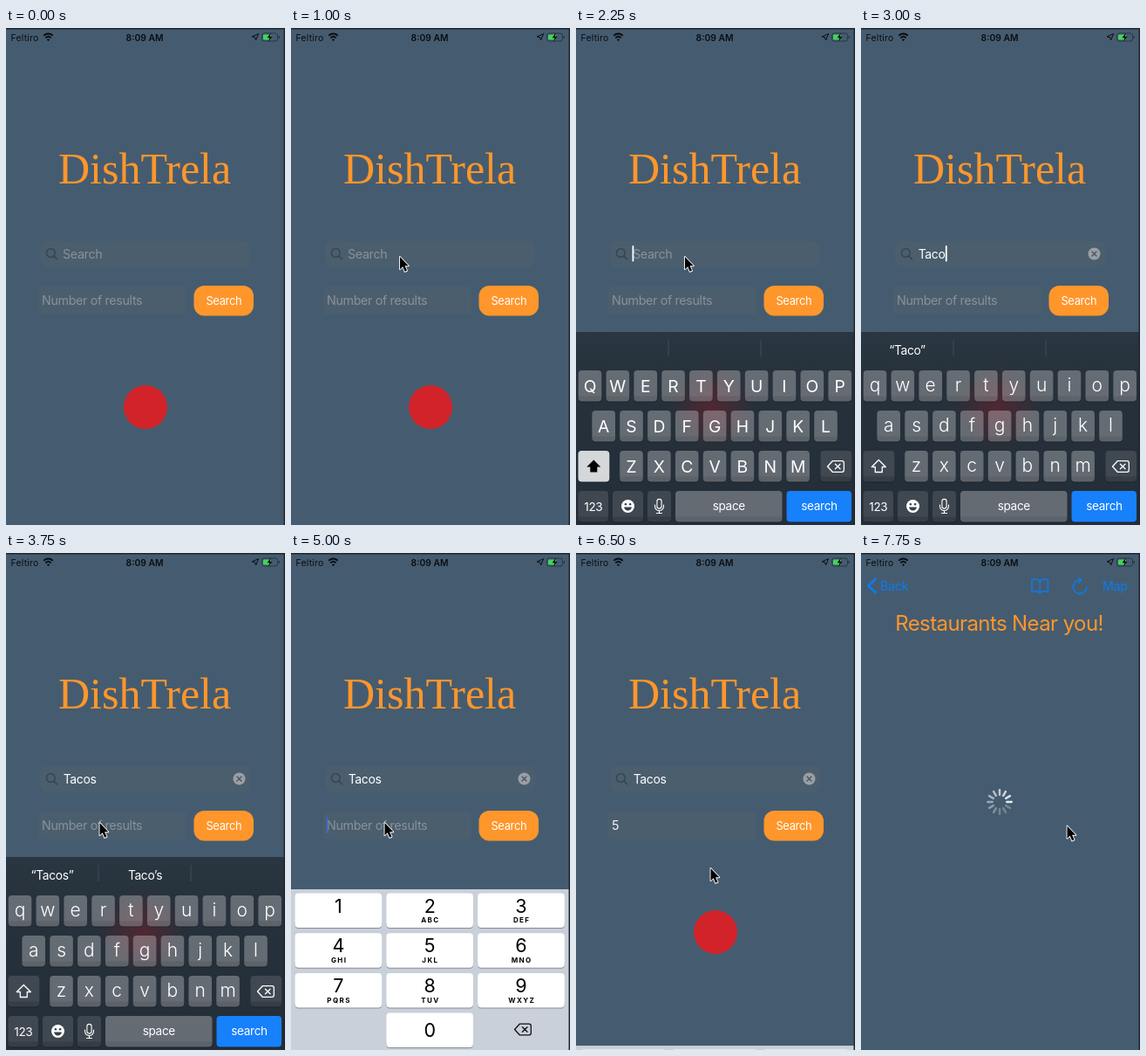
An HTML page with a canvas for the animation above (8000 ms loop, 320 px wide and 569 px high).

```html
<!DOCTYPE html>
<html lang="en">
<head>
<meta charset="utf-8">
<title>Restaurant search</title>
<style>
  html, body { margin: 0; width: 100%; height: 100%; overflow: hidden; background: #455c70; }
  canvas { display: block; width: 320px; height: 569px; }
</style>
</head>
<body>
<canvas id="stage"></canvas>
<script>
const W = 320, H = 569, LOOP = 8000, STEP = 250;
const BG = '#455c70', FIELD = '#4a5e6e', ORANGE = '#ff962b', BLUE = '#0a7cf2', GREY = '#8b9196', INK = '#0b0d10';
const canvas = document.getElementById('stage');
const ctx = canvas.getContext('2d');
const ratio = window.devicePixelRatio || 1;
canvas.width = W * ratio;
canvas.height = H * ratio;

// Share of the way still to go, for a motion that starts fast and settles.
const remaining = (t, start, duration, power) =>
  (1 - Math.min(1, Math.max(0, (t - start) / duration))) ** power;

// y is the middle of the capitals.
function text(str, x, y, size, color, { align = 'left', weight = 400, track = -0.025 * size } = {}) {
  ctx.font = `${weight} ${size}px Inter, sans-serif`;
  ctx.letterSpacing = track + 'px';
  ctx.textAlign = align;
  ctx.fillStyle = color;
  ctx.fillText(str, x, y + size * 0.364);
}

function box(x, y, w, h, r, color) {
  ctx.fillStyle = color;
  ctx.beginPath();
  ctx.roundRect(x, y, w, h, r);
  ctx.fill();
}

function disc(x, y, r, color) {
  ctx.fillStyle = color;
  ctx.beginPath();
  ctx.arc(x, y, r, 0, 7);
  ctx.fill();
}

function shape(d, x, y, { fill, stroke, width = 1.3 }) {
  const path = new Path2D(d);
  ctx.save();
  ctx.translate(x, y);
  ctx.lineCap = ctx.lineJoin = 'round';
  ctx.lineWidth = width;
  if (stroke) { ctx.strokeStyle = stroke; ctx.stroke(path); }
  if (fill) { ctx.fillStyle = fill; ctx.fill(path); }
  ctx.restore();
}

function statusBar() {
  text('Feltiro', 5.5, 11, 10.4, INK, { track: 0.25 });
  text('8:09 AM', 159, 11, 10.3, INK, { align: 'center', weight: 600, track: 0 });
  shape('M-4.6-2.2A6.6 6.6 0 0 1 4.6-2.2M-2.6.4A3.8 3.8 0 0 1 2.6.4', 48.5, 10.5, { stroke: INK, width: 1.9 });
  shape('M0 4.8L-1.7 2.6Q0 1.3 1.7 2.6Z', 48.5, 10.5, { fill: INK });
  shape('M3.5-3.5L.5 3.5L-.3.3L-3.5-.5Z', 286, 10.5, { stroke: INK, width: 1 });
  ctx.strokeStyle = '#27323c';
  ctx.lineWidth = 0.9;
  ctx.beginPath();
  ctx.roundRect(293.5, 6, 18, 9, 2.5);
  ctx.stroke();
  box(295, 7.5, 9, 6, 1.2, '#43d45c');
  box(312.6, 9, 1.2, 3, 0.6, '#27323c');
  shape('M1.2-5L-3 .8H-.3L-1.2 5L3-.8H.3Z', 302.5, 10.5, { fill: INK });
}

function home(t, query, count) {
  ctx.fillStyle = BG;
  ctx.fillRect(0, 0, W, H);
  ctx.font = '50px "Liberation Serif", serif';
  ctx.letterSpacing = '0px';
  ctx.textAlign = 'left';
  ctx.fillStyle = ORANGE;
  ctx.fillText('DishTrela', 60, 177.5);

  box(39, 244, 241, 30, 8, FIELD);
  shape('M4.2 0A4.9 4.9 0 1 1-5.6 0A4.9 4.9 0 1 1 4.2 0M2.8 3.5L6.6 7.2', 52, 257.5, { stroke: '#33424f', width: 1.3 });
  if (query) text(query, 65.7, 258.5, 14, '#fff');
  else text('Search', 65, 258.5, 14.3, GREY);
  if (query) {
    disc(267.5, 258.5, 7, '#9a9fa4');
    shape('M-2.5-2.5L2.5 2.5M2.5-2.5L-2.5 2.5', 267.5, 258.5, { stroke: '#435464' });
  }
  if (t >= 1000 && t < 3500 && (query || Math.floor((t - 250) / 500) % 2 === 0)) {
    const width = query ? ctx.measureText(query).width + 1.5 : 0;
    box(64.5 + width, 249, 1.8, 18.5, 0.9, '#fff');
  }

  box(37, 296, 170, 32, 5, FIELD);
  text(count || 'Number of results', 41, 312, 14.3, count ? '#f4f6f8' : GREY);
  if (t >= 4000 && t < 6250 && (count || t / 500 % 2 < 1))
    box(count ? 50.5 : 40.5, 302.5, 2, 18.5, 1, '#4368c4');

  box(215.5, 295, 68.5, 34.5, 12, ORANGE);
  text('Search', 249.8, 312.7, 12.9, t === 7000 ? '#ffd5a6' : '#fff', { align: 'center' });
  disc(160, 434, 25, '#d2232a');
}

function key(x, y, w, h, color, shadow) {
  box(x, y + h - 6, w, 7, [0, 0, 4, 4], shadow);
  box(x, y, w, h, 4, color);
}

function backspace(x, y, color) {
  shape('M-9.5 0L-3.8-6.3H7Q9.3-6.3 9.3-4V4Q9.3 6.3 7 6.3H-3.8ZM-.6-2.8L5 2.8M5-2.8L-.6 2.8', x, y, { stroke: color });
}

function letterKeyboard(offset, query) {
  const top = 348;
  const light = 'rgba(255,255,255,.29)', dark = 'rgba(255,255,255,.12)', shadow = 'rgba(10,14,18,.35)';
  const back = ctx.createLinearGradient(0, top + offset, 0, H + offset);
  back.addColorStop(0, '#2a3641');
  back.addColorStop(0.25, '#26313b');
  back.addColorStop(1, '#242e38');
  ctx.fillStyle = back;
  ctx.fillRect(0, top + offset, W, H);
  const glow = ctx.createRadialGradient(156, 434, 0, 156, 434, 50);
  glow.addColorStop(0, 'rgba(150,25,35,.38)');
  glow.addColorStop(1, 'rgba(150,25,35,0)');
  ctx.fillStyle = glow;
  ctx.fillRect(100, Math.max(380, top + offset), 110, 110);

  ctx.save();
  ctx.translate(0, offset);
  for (const x of [105.5, 211.5]) box(x, 357, 1, 19, 0, '#414d58');
  if (query) text(`“${query}”`, 53, 369, 13.8, '#fff', { align: 'center' });
  if (query === 'Tacos') text('Taco’s', 159.5, 369, 13.8, '#fff', { align: 'center' });

  ['QWERTYUIOP', 'ASDFGHJKL', 'ZXCVBNM'].forEach((letters, row) => {
    const first = [16, 31.7, 63.5][row], y = 392 + row * 46;
    [...letters].forEach((letter, i) => {
      const x = first + i * 31.85;
      key(x - 13.3, y, 26.6, 35.5, light, shadow);
      if (query) text(letter.toLowerCase(), x, y + 16, 21, '#fff', { align: 'center', weight: 300, track: 0 });
      else text(letter, x, y + 18, 19.3, '#fff', { align: 'center', track: 0 });
    });
  });

  key(2.5, 484, 35.8, 35.5, query ? dark : '#d4d8db', shadow);
  const arrow = 'M0-7.5L8 .5H4V6.5H-4V.5H-8Z';
  shape(arrow, 20.3, 502, query ? { stroke: '#fff' } : { fill: '#000' });
  key(280.5, 484, 35.5, 35.5, dark, shadow);
  backspace(298, 502, '#fff');

  key(2.5, 530, 34.5, 35.5, dark, shadow);
  text('123', 19.8, 548, 13.6, '#fff', { align: 'center' });
  key(42, 530, 35, 35.5, dark, shadow);
  disc(59.5, 547.5, 7.5, '#fff');
  disc(56.9, 545.3, 1.2, '#35404a');
  disc(62.1, 545.3, 1.2, '#35404a');
  shape('M-4.5 1H4.5Q3.5 5 0 5Q-3.5 5-4.5 1Z', 59.5, 547.5, { fill: '#35404a' });
  key(82, 530, 27, 35.5, dark, shadow);
  shape('M-2.6-5.5A2.6 2.6 0 0 1 2.6-5.5V0A2.6 2.6 0 0 1-2.6 0ZM-5-1.5V0A5 5 0 0 0 5 0V-1.5M0 5V8M-3 8H3', 95.5, 547.5, { stroke: '#fff', width: 1.1 });
  key(114, 530, 122.5, 35.5, light, shadow);
  text('space', 175.3, 547.5, 13.6, '#fff', { align: 'center' });
  key(241.5, 530, 74.5, 35.5, '#1780fb', shadow);
  text('search', 279, 547.5, 13.6, '#fff', { align: 'center' });
  ctx.restore();
}

function numberPad(offset, pressed) {
  const groups = ['', 'ABC', 'DEF', 'GHI', 'JKL', 'MNO', 'PQRS', 'TUV', 'WXYZ'];
  ctx.save();
  ctx.translate(0, offset);
  ctx.fillStyle = '#cad0d9';
  ctx.fillRect(0, 385, W, H);
  for (let n = 1; n <= 10; n++) {
    const col = n === 10 ? 1 : (n - 1) % 3, row = Math.floor((n - 1) / 3);
    const x = 4.6 + col * 104.8, y = 389.5 + row * 45.7, middle = x + 49.8;
    key(x, y, 99.5, 39.5, n === pressed ? '#b3bac5' : '#fff', '#898d93');
    text(String(n % 10), middle, y + (n === 10 ? 19.5 : 14.3), 21.5, '#000', { align: 'center', track: 0 });
    text(groups[n - 1] || '', middle + 0.7, y + 30.7, 8, '#000', { align: 'center', weight: 700, track: 1.4 });
  }
  backspace(266, 545.5, '#111');
  ctx.restore();
}

function results(t, left, opacity) {
  ctx.save();
  ctx.translate(left, 0);
  ctx.fillStyle = BG;
  ctx.fillRect(0, 0, W, H);
  text('Restaurants Near you!', 158.5, 80.5, 24, ORANGE, { align: 'center' });
  const lead = Math.floor(t * 12 / 1000) + 6;
  ctx.lineCap = 'round';
  ctx.lineWidth = 2.5;
  for (let i = 0; i < 12; i++) {
    const age = (lead - i) % 12, angle = i * Math.PI / 6;
    const sx = Math.sin(angle), sy = -Math.cos(angle);
    ctx.strokeStyle = `rgba(240,243,246,${Math.max(0.28, 0.95 - age * 0.075)})`;
    ctx.beginPath();
    ctx.moveTo(159 + sx * 8.3, 285 + sy * 8.3);
    ctx.lineTo(159 + sx * 13.7, 285 + sy * 13.7);
    ctx.stroke();
  }
  ctx.restore();

  // The navigation bar fades in place while the page slides.
  ctx.save();
  ctx.globalAlpha = opacity;
  shape('M4.3-8L-4 0L4.3 8', 12.5, 37.5, { stroke: BLUE, width: 2.5 });
  text('Back', 22, 38, 14.3, BLUE);
  shape('M0-5.5Q-4-9-9.2-6.8V7Q-4 5 0 7.8Q4 5 9.2 7V-6.8Q4-9 0-5.5V7.8', 205.2, 37.7, { stroke: BLUE, width: 1.4 });
  shape('M1-7.5A7.8 7.8 0 1 0 7.8 0M-1.5-10.3L1.7-7.4L-1.5-4.5', 251, 38.5, { stroke: BLUE, width: 1.4 });
  text('Map', 277, 38, 14.3, BLUE);
  ctx.restore();
}

// Time, x and y of the pointer.
const pointerPath = [
  [500, 190, 345], [750, 125, 262], [3250, 125, 262], [3500, 107.5, 309], [5000, 107.5, 309],
  [5250, 157, 463], [5750, 157, 463], [6000, 154.5, 361], [6500, 154.5, 361], [7000, 236.5, 312.5], [LOOP, 236.5, 312.5]
];

function pointer(t) {
  if (t < 500 || (t >= 2500 && t < 3500)) return;
  const next = pointerPath.findIndex(([time]) => time > t);
  const [t0, x0, y0] = pointerPath[next - 1], [t1, x1, y1] = pointerPath[next];
  const p = (t - t0) / (t1 - t0);
  shape('M0 0V14.2L3.2 11.2L5.6 16.8L8 15.8L5.6 10.3H9.8Z', x0 + (x1 - x0) * p, y0 + (y1 - y0) * p,
    { fill: '#000', stroke: '#fff', width: 1.8 });
}

function draw(t) {
  const typed = t < 2500 ? 0 : Math.min(5, 1 + Math.ceil((t - 2500) / STEP * 1.34));
  const query = 'Tacos'.slice(0, typed);
  const count = t >= 5500 ? '5' : '';
  const push = 1 - remaining(t, 7125, 375, 3);

  ctx.setTransform(ratio, 0, 0, ratio, 0, 0);
  ctx.save();
  ctx.translate(-96 * push, 0);
  home(t, query, count);
  ctx.restore();
  if (t >= 1000 && t < 4000) letterKeyboard(221 * remaining(t, 1000, 519, 4), query);
  if (t >= 4000 && t < 6750) numberPad(184 * (1 - remaining(t, 6250, 420, 4)), t === 5500 ? 5 : 0);
  if (push > 0) results(t, W * (1 - push), push);
  statusBar();
  pointer(t);
  ctx.fillStyle = '#20262e';
  ctx.fillRect(0, 0, W, 1.5);
  ctx.fillRect(318.5, 0, 1.5, H);
}

function tick(now) {
  draw(Math.floor(now % LOOP / STEP) * STEP);
  requestAnimationFrame(tick);
}
requestAnimationFrame(tick);
</script>
</body>
</html>
```
